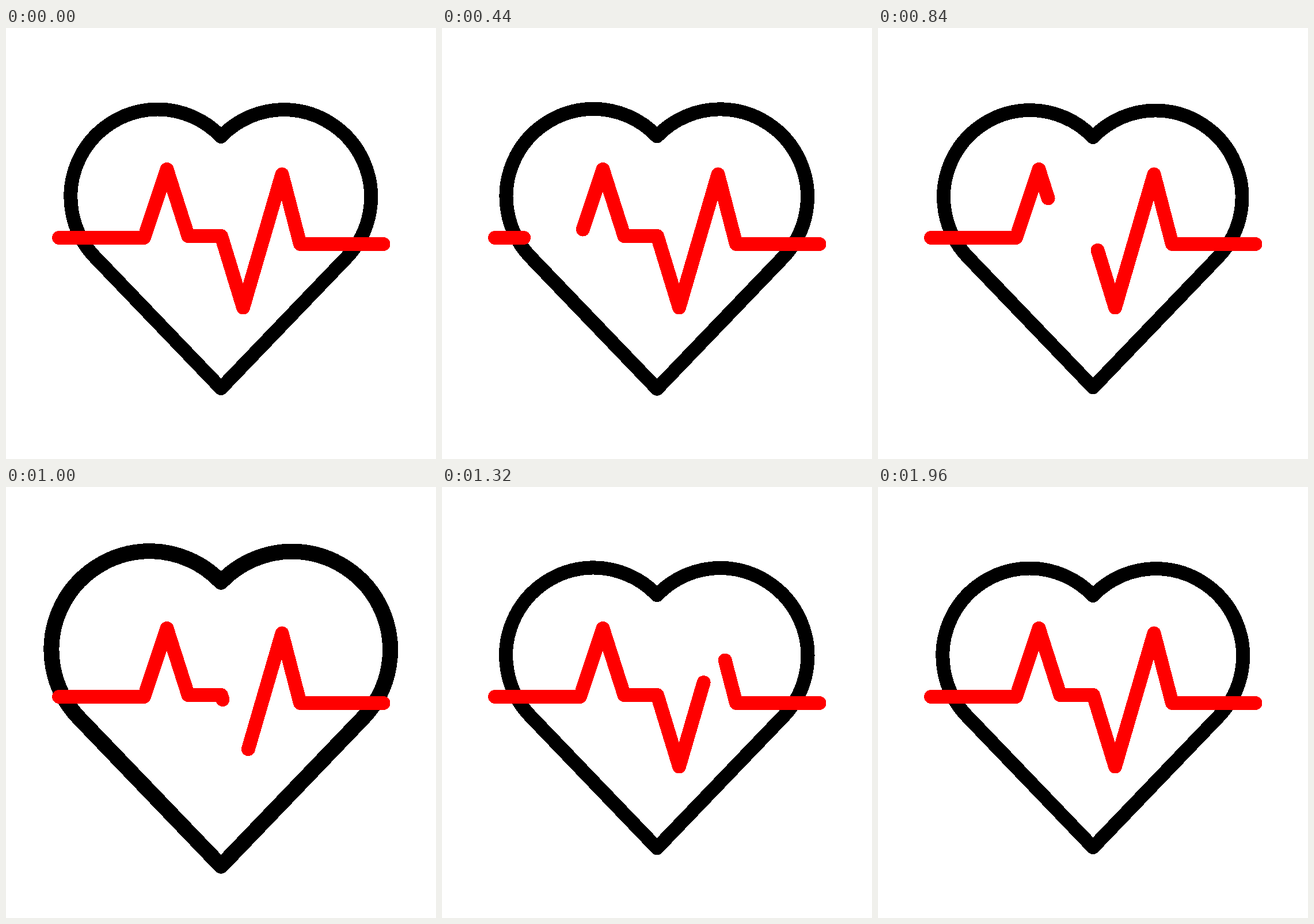
Recreate the animation shown at these times as an HTML page. Size 747x750 px, loop 2 s.

```html
<!DOCTYPE html>
<html lang="en">
<head>
<meta charset="utf-8">
<title>Heartbeat</title>
<style>
html, body { margin: 0; width: 100%; height: 100%; overflow: hidden; background: #fff; }
svg { display: block; width: 100%; height: 100%; }
path { fill: none; stroke-width: 24; stroke-linecap: round; stroke-linejoin: round; shape-rendering: crispEdges; }
</style>
</head>
<body>
<svg viewBox="0 0 747 750">
  <path id="heart" stroke="#000" d="M373.5 627L154 398A152 152 0 0 1 264 141.5A152 152 0 0 1 373.5 189A152 152 0 0 1 483 142A152 152 0 0 1 593 398Z"/>
  <path id="pulse" stroke="#f00" d="M92 365H240L279.5 246L316.5 362H374L412 486.5L479.5 254.5L511 376H655.5"/>
</svg>
<script>
const LOOP = 2000, STEP = 40, BEAT = 173.5;
const heart = document.getElementById('heart');
const pulse = document.getElementById('pulse');
const length = pulse.getTotalLength();

// [time in beats, scale]
const scaleKeys = [[0, 1], [2, .899], [3, 1.087], [4, .905], [6, 1.137], [8, .99], [10, 1]];

const clamp = x => Math.min(1, Math.max(0, x));
const smooth = s => s * s * (3 - 2 * s);

// Cubic bezier (.25, 0, .75, 1), solved by bisection
function ease(x) {
  let lo = 0, hi = 1;
  for (let i = 0; i < 24; i++) {
    const s = (lo + hi) / 2, r = 1 - s;
    if (.75 * s * r * r + 2.25 * s * s * r + s * s * s < x) lo = s;
    else hi = s;
  }
  return smooth(lo);
}

function scaleAt(t) {
  const beat = t / BEAT;
  const i = scaleKeys.findIndex(([time]) => time > beat);
  if (i < 0) return 1;
  const [t0, a] = scaleKeys[i - 1], [t1, b] = scaleKeys[i];
  return a + (b - a) * smooth((beat - t0) / (t1 - t0));
}

function draw(t) {
  heart.setAttribute('transform', `translate(373.5 375) scale(${scaleAt(t)}) translate(-373.5 -375)`);
  // The line is hidden between head and tail; both overshoot so no cap is left at the ends
  const head = ease(clamp((t - 255) / 1690)) * (length + 2) - 1;
  const tail = ease(clamp((t - 62) / 1720)) * (length + 2);
  pulse.setAttribute('stroke-dasharray', `${2 * length} ${tail - head}`);
  pulse.setAttribute('stroke-dashoffset', -tail);
}

function tick() {
  draw(Math.floor(performance.now() % LOOP / STEP) * STEP);
  requestAnimationFrame(tick);
}
tick();
</script>
</body>
</html>
```
